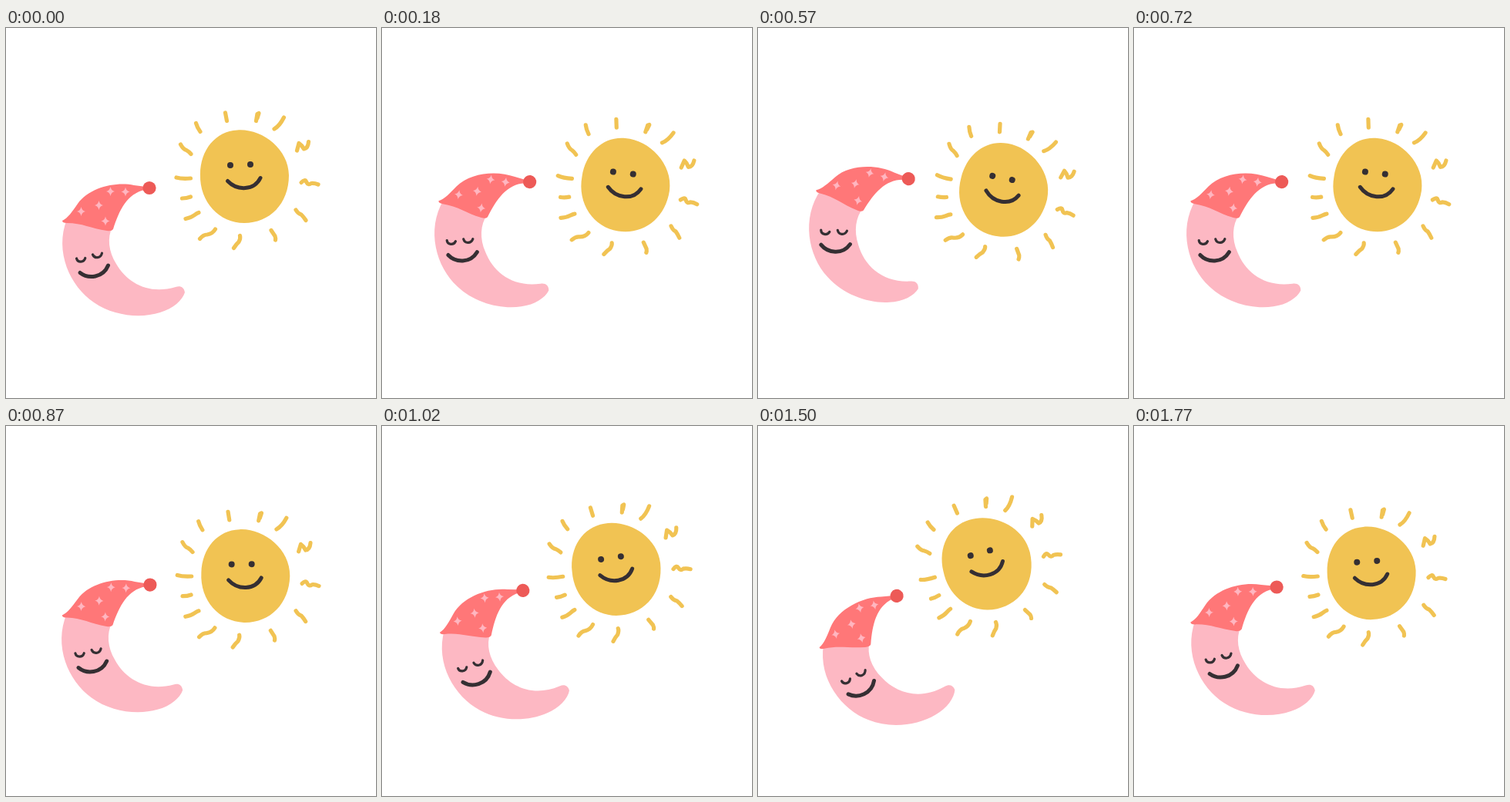
An HTML page that plays this animation: 480 by 480 pixels, repeating every 1.8 s.

```html
<!DOCTYPE html>
<html lang="en">
<head>
<meta charset="utf-8">
<title>Moon and sun</title>
<style>
  html, body { margin: 0; width: 100%; height: 100%; overflow: hidden; background: #fff; }
  svg { display: block; width: 100%; height: 100%; }
  .line { fill: none; stroke-linecap: round; stroke-linejoin: round; }
  .rays { stroke: #f1c353; stroke-width: 5.2; }
  .ink { stroke: #352f33; stroke-width: 5; }
  .lids { stroke-width: 3.2; }
</style>
</head>
<body>
<svg viewBox="0 0 480 480">
  <defs>
    <path id="star" fill="#ffb6c0" d="M0-6Q1-1 5.5 0Q1 1 0 6Q-1 1-5.5 0Q-1-1 0-6Z"/>
  </defs>
  <g id="scene">
    <!-- sun -->
    <path fill="#f1c353" d="M300 132.500C331 130 366.500 156 367 191C367 228 342 253 309 253C277 253 251 226 252 190C252 158 272 134 300 132.500Z"/>
    <path class="line rays" d="
      M284.500 110L286.500 120.500
      M246.500 123.500Q248 129 252 134.500
      M226.500 151Q230 157.500 234 158.500Q237 160 240 163.500
      M221 194Q228 196 239.500 195
      M228.500 221Q234 221 239.500 219
      M233 247.500Q240 246 244 243T250 239.500
      M251.500 273.500Q256 268 261 268Q268 267 271.500 261
      M295.500 285.500Q299 280 302 277.500Q304.500 273 303.500 269.500
      M344 262.500Q347 267 349 270Q350 273 349.500 275
      M376 236Q379 241 383 242Q386 245 389 249.500
      M383 200.500Q388 195.500 389.500 199.500Q392 204.500 396 201.500Q400 201 405 203
      M377.500 159L380 149.500Q384 152 386.500 157Q392 156 392.500 147.500
      M348 131Q355 127 360.500 116
      M324.500 120.500L326 111.500L328 110.500L326 117"/>
    <g fill="#352f33">
      <circle cx="291" cy="178" r="4"/>
      <circle cx="317" cy="177" r="4"/>
    </g>
    <path class="line ink" d="M287.500 198.500C300 211.500 322 211 330 194.500"/>

    <!-- moon -->
    <path fill="#fdb8c3" d="M79 248C62.500 290 83 335 114 356C140 374 175 377 200 369C217 364 229 353 232 343C231 336 226 334 220 336C185 346.500 157 330.500 143 306C133 290 131 272 138 258Z"/>
    <path class="line ink lids" d="M91.500 299C93 304.500 101 304.500 102.800 298.500M112.500 294C115 299.500 123 299 124.500 292"/>
    <path class="line ink" d="M96 317.500C107 326 126 324 132.500 308"/>

    <!-- nightcap -->
    <path fill="#ff7778" d="M73 250C80 247 86 238 93 228C108 207 142 199 166 204L182 206L180 210C157 215 147 236 139 261Q137 264 131 263C110 260 99 253 79 253Q73 253 73 250Z"/>
    <g id="stars"></g>
    <circle cx="186" cy="207.500" r="8.600" fill="#ed5a57"/>
  </g>
</svg>
<script>
  const LOOP = 1800, STEP = 30, SWING = 15;
  const scene = document.getElementById('scene');

  document.getElementById('stars').innerHTML =
    [[97.5, 238], [120.5, 230], [135.5, 212], [155, 212.5], [129, 250.5]]
      .map(([x, y]) => `<use href="#star" x="${x}" y="${y}"/>`).join('');

  // The whole scene rocks about the stage centre, at a stepped frame rate.
  function draw(now) {
    const t = Math.floor(now % LOOP / STEP) * STEP;
    const angle = SWING * Math.sin(2 * Math.PI * t / LOOP);
    scene.setAttribute('transform', `rotate(${angle} 240 240)`);
    requestAnimationFrame(draw);
  }
  draw(performance.now());
</script>
</body>
</html>
```
